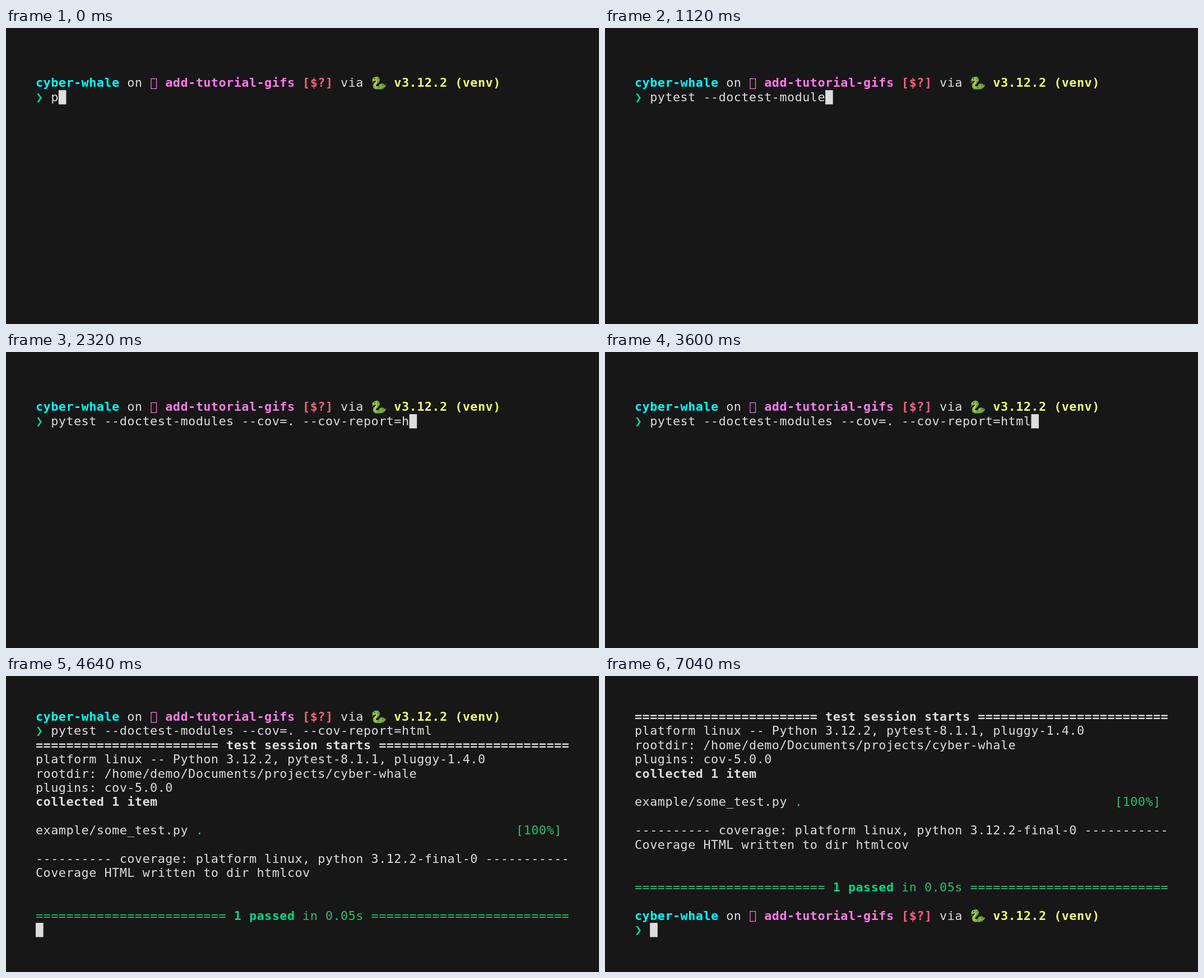
Recreate the animation shown at these times as an HTML page with a canvas. Size 1058x529 px, loop 7.4 s.

```html
<!DOCTYPE html>
<html lang="en">
<head>
<meta charset="utf-8">
<title>Terminal test run</title>
<style>
  html, body { margin: 0; width: 100%; height: 100%; overflow: hidden; background: #171717; }
  canvas { display: block; }
</style>
</head>
<body>
<canvas id="screen" width="1058" height="529"></canvas>
<script>
const ctx = document.getElementById('screen').getContext('2d');

const LOOP = 7400, FRAME = 40;
const LEFT = 53, TOP = 60.3, CELL = 13.603, ROW = 25.392, ROWS = 16;
const BASELINE = 19.8, FONT = '21.765px "DejaVu Sans Mono", monospace';

const FG = '#dddddd', GREEN = '#31bb71', BRIGHT_GREEN = '#00d787', CYAN = '#00fefe',
      PINK = '#ff7aea', RED = '#fe5f86', YELLOW = '#ebff71';

const COMMAND = 'pytest --doctest-modules --cov=. --cov-report=html';
const BOX = '\u25af', SNAKE = '\u{1f40d}';

const plain = (text, color = FG) => ({ text, color, weight: '' });
const bold = (text, color = FG) => ({ text, color, weight: 'bold ' });

const prompt = [
  bold('cyber-whale', CYAN), plain(' on '), bold(BOX + ' add-tutorial-gifs ', PINK),
  bold('[$?]', RED), plain(' via '), bold(SNAKE + ' v3.12.2 (venv)', YELLOW)
];
const inputLine = text => [bold('❯ ', BRIGHT_GREEN), plain(text)];

const output = [
  [bold('='.repeat(24) + ' test session starts ' + '='.repeat(25))],
  [plain('platform linux -- Python 3.12.2, pytest-8.1.1, pluggy-1.4.0')],
  [plain('rootdir: /home/demo/Documents/projects/cyber-whale')],
  [plain('plugins: cov-5.0.0')],
  [bold('collected 1 item')],
  [],
  [plain('example/some_test.py '), plain('.' + ' '.repeat(41) + '[100%]', GREEN)],
  [],
  [plain('-'.repeat(10) + ' coverage: platform linux, python 3.12.2-final-0 ' + '-'.repeat(11))],
  [plain('Coverage HTML written to dir htmlcov')],
  [],
  [],
  [plain('='.repeat(25) + ' ', GREEN), bold('1 passed', BRIGHT_GREEN),
   plain(' in 0.05s ' + '='.repeat(26), GREEN)]
];

// Everything on the terminal at time t; the cursor sits on the last line.
function terminalAt(t) {
  const typed = Math.min(COMMAND.length, Math.floor((t + 7.5) / 49.9) + 1);
  const start = [[], prompt, inputLine(COMMAND.slice(0, typed))];
  if (t < 4480) return { lines: start, col: typed + 2 };
  if (t < 4600) return { lines: [...start, []], col: 0 };
  if (t < 4640) return { lines: [...start, ...output.slice(0, 6), []], col: 0 };
  if (t < 4680) return { lines: [...start, ...output, []], col: 0 };
  return { lines: [...start, ...output, [], prompt, inputLine('')], col: 2 };
}

function cursorVisible(t) {
  const toggles = [3040, 3600, 4200, 4480, 5280, 5880, 6440, 7040];
  return toggles.filter(time => time <= t).length % 2 === 0;
}

function strokePath(path, color, width) {
  ctx.strokeStyle = color;
  ctx.lineWidth = width;
  ctx.stroke(new Path2D(path));
}

function drawSnake(x, y) {
  ctx.save();
  ctx.translate(x, y);
  ctx.lineCap = ctx.lineJoin = 'round';
  strokePath('M3 10 L1 12.5 M3 10 L3.5 13', '#e8453c', 0.9);
  strokePath('M9 20 C14 23 22 22 22 18 C22 15 18 15 16 17', '#689f38', 4.4);
  strokePath('M22 19 Q25 20 25.2 16.5', '#7cb342', 1.8);
  strokePath('M6 6 C11 1 15 6 11.5 10 C8 14 4 16 6 19.5 C8 23 17 21 18 17', '#7cb342', 5);
  strokePath('M7 8 C11 6 11 9 8.5 12 C6 15 6 18 9 20', '#d4df72', 1.5);
  strokePath('M13 5 L13.1 6 M12 10 L11.5 10.6 M13 20.5 L14 20.2 M20 16.5 L20.7 17', '#467b2b', 1.6);
  strokePath('M4 7.5 Q5 4 8 4.2', '#8bc34a', 4.5);
  ctx.fillStyle = '#263238';
  ctx.beginPath();
  ctx.arc(6.2, 5, 1.1, 0, 2 * Math.PI);
  ctx.fill();
  ctx.restore();
}

function drawLine(segments, y) {
  let col = 0;
  for (const { text, color, weight } of segments) {
    ctx.font = weight + FONT;
    for (const char of text) {
      const x = LEFT + col * CELL;
      if (char === SNAKE) {
        drawSnake(x, y);
        col += 2;
        continue;
      }
      if (char === BOX) {
        ctx.strokeStyle = color;
        ctx.lineWidth = 1.2;
        ctx.strokeRect(x + 1.9, y + 4.9, 9.6, 17.8);
      } else {
        ctx.fillStyle = color;
        ctx.fillText(char, x, y + BASELINE);
      }
      col++;
    }
  }
}

function draw(t) {
  const { lines, col } = terminalAt(t);
  const scroll = Math.max(0, lines.length - ROWS);
  const rowY = index => TOP + (index - scroll) * ROW;

  ctx.fillStyle = '#171717';
  ctx.fillRect(0, 0, 1058, 529);
  lines.forEach((line, index) => {
    if (index >= scroll) drawLine(line, rowY(index));
  });
  if (cursorVisible(t)) {
    ctx.fillStyle = FG;
    ctx.fillRect(LEFT + col * CELL, rowY(lines.length - 1), CELL, ROW);
  }
}

function tick() {
  const t = performance.now() % LOOP;
  draw(Math.floor(t / FRAME) * FRAME);
  requestAnimationFrame(tick);
}
tick();
</script>
</body>
</html>
```
